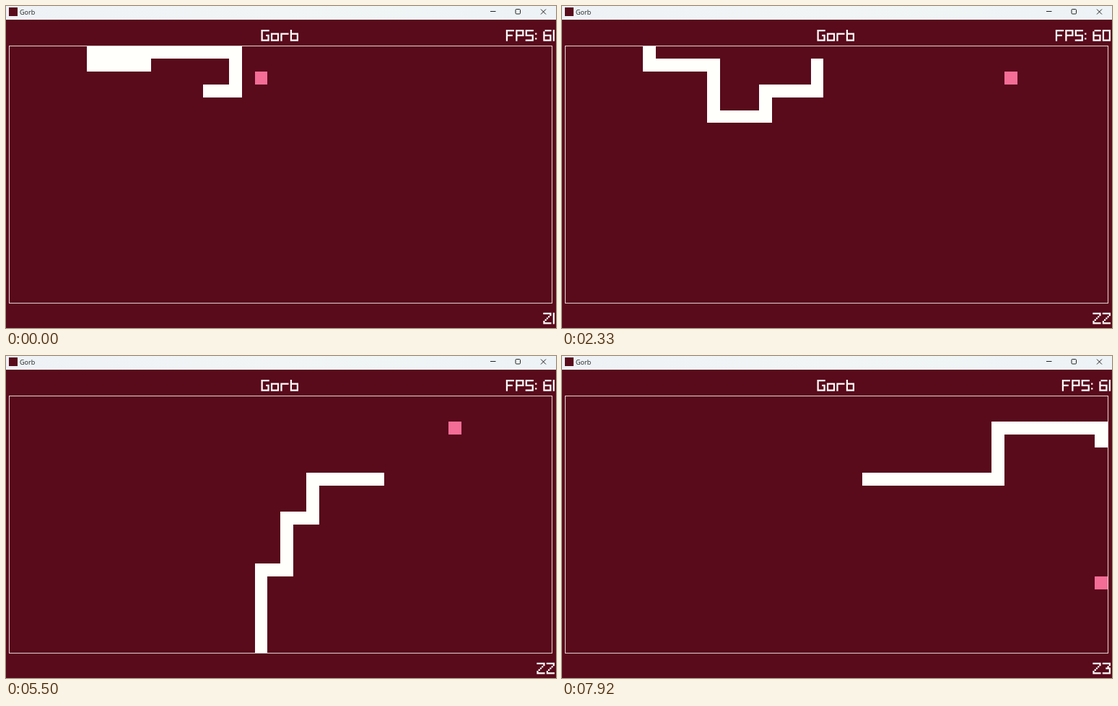
These frames come from a looping animation (762x447 px, 8000 ms). An HTML page with a canvas:

```html
<!DOCTYPE html>
<html lang="en">
<head>
<meta charset="utf-8">
<title>Gorb</title>
<style>
  html, body { margin: 0; width: 100%; height: 100%; overflow: hidden; background: #590a1b; }
  canvas { display: block; }
</style>
</head>
<body>
<canvas id="stage" width="762" height="447" aria-label="Gorb, a snake game"></canvas>
<script>
const ctx = document.getElementById('stage').getContext('2d');
const MAROON = '#590a1b', WHITE = '#fffffc', PINK = '#f46d96';
const LOOP = 8000, FPS = 12, STEPS_PER_FRAME = 5 / 8;
const COLS = 42, ROWS = 20, CELL = 17.9, LEFT = 4.45, TOP = 55;
const DOT = 2.24; // size of one dot of the pixel font

// Pixel font, seven rows per glyph
const GLYPHS = {
  F: '##### #.... #.... ####. #.... #.... #....',
  P: '##### #...# #...# ##### #.... #.... #....',
  S: '##### #.... #.... ##### ....# ....# #####',
  G: '##### #.... #.... #..## #...# #...# #####',
  o: '..... ..... ##### #...# #...# #...# #####',
  r: '..... ..... ##### #.... #.... #.... #....',
  b: '#.... #.... ##### #...# #...# #...# #####',
  0: '##### #...# #...# #...# #...# #...# #####',
  1: '# # # # # # #',
  2: '##### ....# ...#. ..#.. .#... #.... #####',
  3: '##### ....# ...#. ..### ....# ....# #####',
  6: '.#### #.... #.... ##### #...# #...# #####',
  ':': '. . # . . # .',
  ' ': '..'
};

// Route of the head: the first 22 cells are the starting body
const MOVES = { R: [1, 0], L: [-1, 0], U: [0, -1], D: [0, 1] };
const route = [[15, 3]];
for (const [, dir, count] of
  'R2 U3 L11 D1 R5 D4 R4 U2 R4 U10 R2 U4 R2 U3 R10 U4 R8 D1'.matchAll(/(\w)(\d+)/g)) {
  const [dx, dy] = MOVES[dir];
  for (let i = 0; i < count; i++) {
    const [x, y] = route[route.length - 1];
    route.push([(x + dx + COLS) % COLS, (y + dy + ROWS) % ROWS]);
  }
}
const START_LENGTH = 22;
const MEALS = [16, 51]; // steps at which the food is eaten
const FOOD = [[19, 2], [34, 2], [41, 14]];

function pixelText(text, x, y, alignRight) {
  const glyphs = [...text].map(c => GLYPHS[c].split(' '));
  if (alignRight) x -= DOT * (glyphs.reduce((w, g) => w + g[0].length + 1, 0) - 1);
  ctx.fillStyle = WHITE;
  ctx.beginPath();
  for (const rows of glyphs) {
    rows.forEach((row, j) => [...row].forEach((dot, i) => {
      if (dot === '#') ctx.rect(x + i * DOT, y + j * DOT, DOT, DOT);
    }));
    x += (rows[0].length + 1) * DOT;
  }
  ctx.fill();
}

function drawCell([col, row], color) {
  const x = Math.round(LEFT + col * CELL), y = Math.round(TOP + row * CELL);
  ctx.fillStyle = color;
  ctx.fillRect(x, y, Math.round(LEFT + (col + 1) * CELL) - x, Math.round(TOP + (row + 1) * CELL) - y);
}

function drawTitleBar() {
  const shade = ctx.createLinearGradient(0, 0, 762, 0);
  shade.addColorStop(0, '#eef2f6');
  shade.addColorStop(0.5, '#f1f5f5');
  shade.addColorStop(1, '#edf3f6');
  ctx.fillStyle = shade;
  ctx.fillRect(0, 0, 762, 19);
  ctx.fillStyle = MAROON;
  ctx.fillRect(4, 2, 12, 12);
  ctx.fillStyle = '#1c1c1c';
  ctx.font = '9px "Open Sans", sans-serif';
  ctx.fillText('Gorb', 19, 11.5);

  ctx.strokeStyle = '#222';
  ctx.lineWidth = 1;
  ctx.beginPath();
  ctx.moveTo(671, 7.5);
  ctx.lineTo(678.5, 7.5);
  ctx.roundRect(706, 4.5, 6.5, 6.5, 1.2);
  ctx.moveTo(741, 4.5);
  ctx.lineTo(748, 11.5);
  ctx.moveTo(748, 4.5);
  ctx.lineTo(741, 11.5);
  ctx.stroke();
}

function draw(now) {
  const time = now % LOOP;
  const frame = Math.min(95, Math.floor((time + 5) * FPS / 1000));
  const step = Math.floor(frame * STEPS_PER_FRAME);
  const eaten = MEALS.filter(s => step >= s).length;
  const slow = (frame >= 12 && frame < 30) || (frame >= 50 && frame < 60);

  ctx.fillStyle = MAROON;
  ctx.fillRect(0, 0, 762, 447);
  drawTitleBar();
  pixelText('Gorb', 353.5, 33);
  pixelText('FPS: ' + (slow ? 60 : 61), 760, 33, true);
  pixelText(String(21 + eaten), 760, 425.7, true);

  drawCell(FOOD[eaten], PINK);
  const head = START_LENGTH + step;
  for (const cell of route.slice(step - eaten, head)) drawCell(cell, WHITE);

  ctx.strokeStyle = '#e6d6d9';
  ctx.lineWidth = 1;
  ctx.strokeRect(4.5, 55.5, 752, 357);
}

const start = performance.now();
function tick() {
  draw(performance.now() - start);
  requestAnimationFrame(tick);
}
tick();
</script>
</body>
</html>
```
